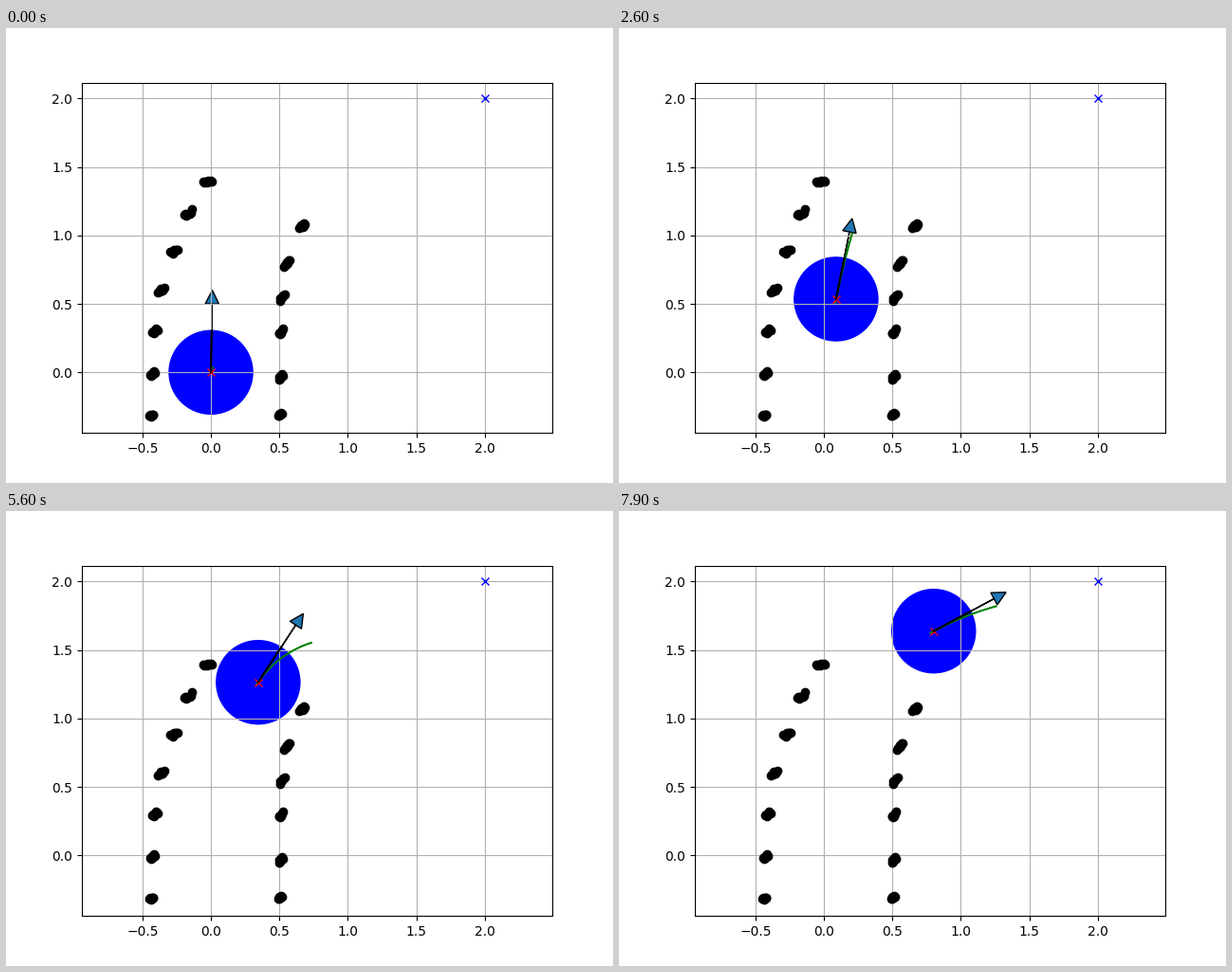
Animation, 640 px wide and 480 px high, one loop 8 s. Source, as a matplotlib script:

```python
import numpy as np
import matplotlib.pyplot as plt
from matplotlib.animation import FuncAnimation

FRAMES, DT = 80, 0.1
MAX_SPEED, ACCEL = 0.259, 0.02
RADIUS, GOAL = 0.305, (2.0, 2.0)
ARROW, HEAD = 0.5, 0.1
PREDICT = 20
XLIM, YLIM = (-0.942, 2.4924), (-0.4428, 2.1163)

# Cluster centres of the two walls, from bottom to top
LEFT = [(-0.435, -0.315), (-0.427, -0.015), (-0.409, 0.298), (-0.364, 0.6),
        (-0.269, 0.884), (-0.167, 1.161), (-0.026, 1.393)]
RIGHT = [(0.505, -0.308), (0.51, -0.03), (0.51, 0.296), (0.52, 0.549),
         (0.553, 0.8), (0.666, 1.071)]

rng = np.random.default_rng(4)


def scatter(centres, width, widen):
    """Slanted clumps of points that widen upwards and flatten at the ends."""
    u = np.linspace(-1, 1, 8)
    clumps = []
    for k, (x, y) in enumerate(centres):
        v = rng.uniform(-1, 1, u.size)
        height = np.interp(k, [0, 1, 5, 6], [0.012, 0.03, 0.03, 0.01])
        clumps.append(np.column_stack([x + (width + widen * k) * u,
                                       y + height * (0.55 * u + 0.45 * v)]))
    return np.vstack(clumps)


walls = np.vstack([scatter(LEFT, 0.014, 0.003), scatter(RIGHT, 0.011, 0.002)])

# The robot speeds up to its limit and bends right, hardest past the left wall
frames = np.arange(FRAMES)
speed = np.minimum(ACCEL * (frames + 1), MAX_SPEED)
turn = -np.radians(np.interp(frames, [0, 9, 26, 39, 51, 56, 66, 79],
                             [2, 0, 0.25, 0.55, 0.9, 2, 1.3, 0.65]))
heading = np.radians(91) + np.cumsum(turn)


def hops(velocity, angles):
    return velocity * DT * np.array([np.cos(angles), np.sin(angles)])


step = hops(speed, heading).T
path = np.cumsum(step, axis=0) - step[0]


def predicted(i):
    """Constant-turn arc beginning one step behind the robot."""
    angles = heading[i] + turn[i] * np.arange(PREDICT)
    start = (path[i] - step[i])[:, None]
    ahead = np.cumsum(hops(speed[i], angles), axis=1)
    return np.hstack([start, start + ahead])


fig, ax = plt.subplots(figsize=(6.4, 4.8), dpi=100)
ax.grid(True)
route, = ax.plot([], [], "-g")
centre, = ax.plot([], [], "xr")
ax.plot(*GOAL, "xb")
ax.plot(*walls.T, "ok")
body = ax.add_artist(plt.Circle((0, 0), RADIUS, color="b"))
nose, = ax.plot([], [], "-k")
arrow = ax.arrow(0, 0, 0, ARROW, head_length=HEAD, head_width=HEAD)
ax.set(xlim=XLIM, ylim=YLIM)


def draw(i):
    x, y = path[i]
    c, s = np.cos(heading[i]), np.sin(heading[i])
    route.set_data(*predicted(i))
    centre.set_data([x], [y])
    body.center = x, y
    nose.set_data([x, x + RADIUS * c], [y, y + RADIUS * s])
    arrow.set_data(x=x, y=y, dx=ARROW * c, dy=ARROW * s)
    return route, centre, body, nose, arrow


anim = FuncAnimation(fig, draw, frames=FRAMES, interval=100,
                     repeat=True, repeat_delay=0)
plt.show()
```
